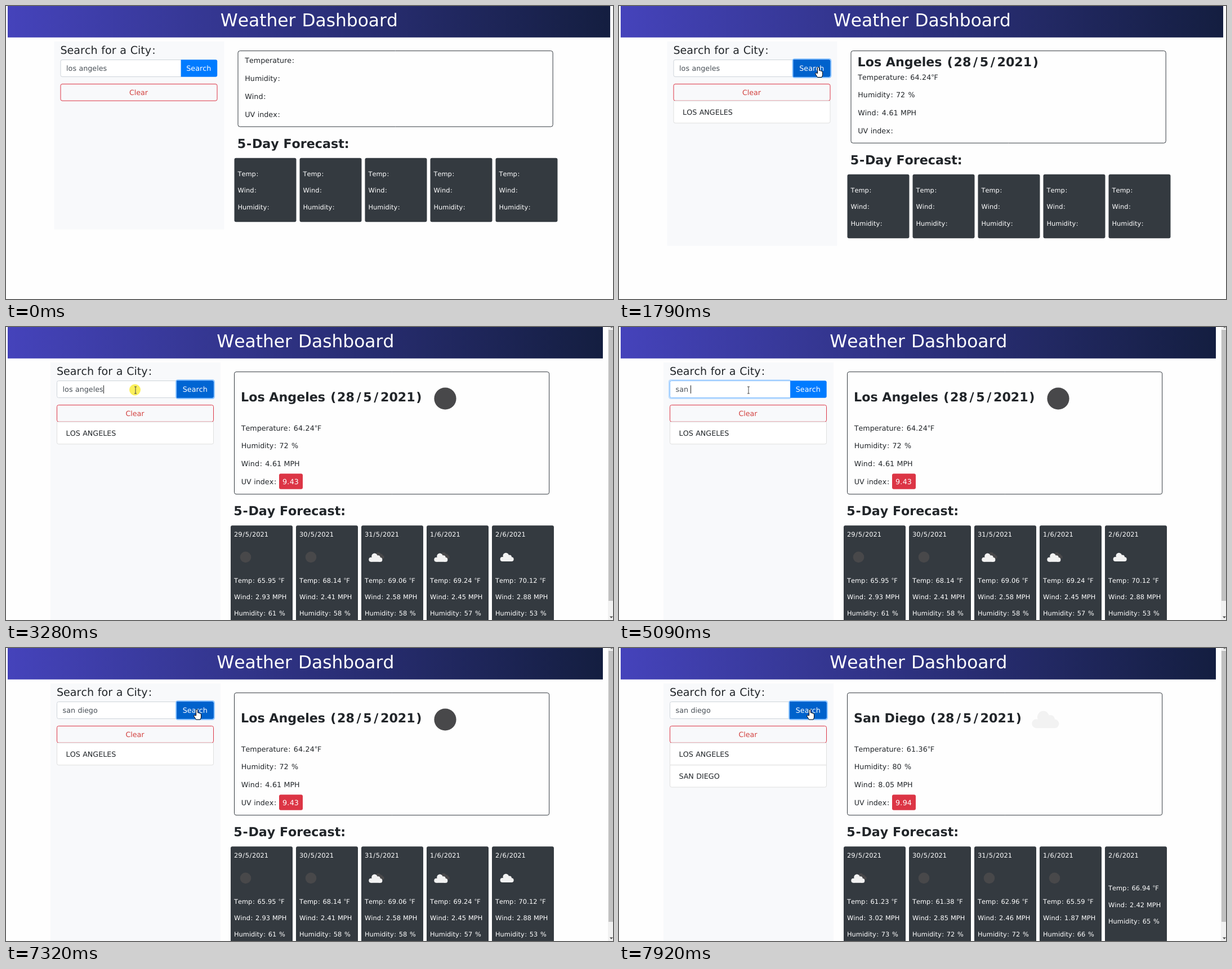
An HTML page with a canvas for the animation above (8 s loop, 1078 by 520 pixels).

```html
<!DOCTYPE html>
<html lang="en">
<head>
<meta charset="utf-8">
<title>Weather Dashboard</title>
<style>
html, body { margin: 0; width: 100%; height: 100%; overflow: hidden; background: #fefefe; }
canvas { display: block; }
</style>
</head>
<body>
<canvas id="stage" width="1078" height="520"></canvas>
<script>
const ctx = document.getElementById('stage').getContext('2d');
const LOOP = 8000, BODY = 12.69, CARD = 11.4, HEAD = 22.2;
const INK = '#212529', DARK = '#343a40', RED = '#dc3545', MOON = '#48484a', CLOUD = '#f2f2f2';

const CITIES = {
  la: { name: 'Los Angeles', temp: '64.24', hum: 72, wind: '4.61', uv: '9.43', icon: 'moon',
    days: [['65.95', '2.93', 61], ['68.14', '2.41', 58], ['69.06', '2.58', 58], ['69.24', '2.45', 57], ['70.12', '2.88', 53]],
    icons: ['moon', 'moon', 'broken', 'broken', 'cloud'] },
  sd: { name: 'San Diego', temp: '61.36', hum: 80, wind: '8.05', uv: '9.94', icon: 'cloud',
    days: [['61.23', '3.02', 73], ['61.38', '2.85', 72], ['62.96', '2.46', 72], ['65.59', '1.87', 66], ['66.94', '2.42', 65]],
    icons: ['broken', 'moon', 'moon', 'moon', null] }
};
const DATES = ['29/5/2021', '30/5/2021', '31/5/2021', '1/6/2021', '2/6/2021'];

const clamp = v => Math.max(0, Math.min(1, v));
const ramp = (t, start, length = 130) => clamp((t - start) / length);
const between = (t, a, b) => t >= a && t < b;

// Extra room around punctuation, in em
const PAD = { ' ': .034, ':': .117, '/': .117, '.': .046, '%': .126 };
const BOLD_PAD = { '/': .324, '(': .14, ')': .14, '-': .065 };

// Draws text centred on y and returns the x where it ends
function text(str, x, y, size, color = INK, bold = false) {
  ctx.font = `${bold ? 'bold ' : ''}${size}px "DejaVu Sans", sans-serif`;
  ctx.fillStyle = color;
  for (const part of str.split(/([ :\/.%()℉-])/)) {
    if (part === '℉') ctx.font = `${size}px "Noto Sans CJK JP", "DejaVu Sans", sans-serif`;
    const pad = ((bold ? BOLD_PAD : PAD)[part] || 0) * size;
    ctx.fillText(part, x + pad / 2, y + size * .36);
    x += ctx.measureText(part).width + pad;
  }
  return x;
}

function box(x, y, w, h, radius, fill, stroke) {
  ctx.beginPath();
  ctx.roundRect(x, y, w, h, radius);
  if (fill) { ctx.fillStyle = fill; ctx.fill(); }
  if (stroke) { ctx.strokeStyle = stroke; ctx.lineWidth = 1; ctx.stroke(); }
}

function disc(x, y, r, fill) {
  ctx.beginPath();
  ctx.arc(x, y, r, 0, 7);
  ctx.fillStyle = fill;
  ctx.fill();
}

function cloud(x, y, scale, fill) {
  for (const [dx, dy, r] of [[-1.7, -2.3, 5.3], [4.5, 0, 4], [-7.9, 3.6, 4], [8.3, 3.7, 3.9]])
    disc(x + dx * scale, y + dy * scale, r * scale, fill);
  ctx.fillRect(x - 7.9 * scale, y, 16.2 * scale, 7.6 * scale);
}

function weatherIcon(kind, x, y, scale) {
  if (kind === 'moon') disc(x, y, 9.8 * scale, MOON);
  if (kind === 'broken') {
    cloud(x + 5, y - 3, .75, MOON);
    cloud(x - 1.3, y + .8, 1, CLOUD);
  }
  if (kind === 'cloud') cloud(x, y, scale, CLOUD);
}

function pageState(t) {
  const { la, sd } = CITIES;
  if (t < 1790) return { list: [] };
  if (t < 1860) return { city: la, list: [la] };
  if (t < 1990) return { city: la, data: la, list: [la] };
  if (t < 7390) return { city: la, data: la, icons: la.icons, scroll: true, list: [la] };
  const data = t < 7520 ? la : sd, icons = t < 7590 ? la.icons : sd.icons;
  return { city: sd, data, icons, scroll: t >= 7920, list: [la, sd] };
}

function inputState(t) {
  const typed = [4690, 4890, 4950, 5090, 5290, 5360, 5480, 5680, 5750];
  let value = 'los angeles';
  if (t >= 4430) value = 'san diego'.slice(0, typed.filter(at => t >= at).length);
  else if (t >= 4160) value = value.slice(0, 8 - 2 * Math.floor((t - 4160) / 67));
  else if (t >= 3810) value = value.slice(0, 10);
  const caret = between(t, 3280, 3680) || between(t, 3810, 6280) || between(t, 6810, 7120);
  return { value, caret };
}

// Pointer moves: start, end, from, to
const MOVES = [
  [20, 240, 860, 450, 514, 291],
  [400, 980, 514, 291, 354, 108.5],
  [2560, 3080, 354, 108.5, 230, 112],
  [6590, 7030, 230, 112, 339, 109]
];
function pointerAt(t) {
  const [a, b, x0, y0, x1, y1] = MOVES.filter(m => t >= m[0]).pop() || MOVES[0];
  const p = clamp((t - a) / (b - a)), e = p * p * (3 - 2 * p);
  return { x: x0 + (x1 - x0) * e, y: y0 + (y1 - y0) * e };
}

const HAND = new Path2D('M-1.5 11V1.5a1.5 1.5 0 0 1 3 0V6q2-1 2.5.8q2-.8 2.4.9q1.2-.2 1.2 1.5V13q0 2-1.5 5H-1.5L-5 12.5q-1-2.3.8-2.3Z');
const ARROW = new Path2D('M0 0V12.5L3 9.8L5 14.3L7 13.4L5 9H9Z');
const BEAM = new Path2D('M-2-6H2M0-6V6M-2 6H2');

function drawPointer(t, pointer, overButton, overInput) {
  if (t < 70) return;
  const click = between(t, 1240, 1390) || between(t, 3280, 3410) || between(t, 7120, 7320);
  if (click) disc(pointer.x - 1, pointer.y - .5, 10, 'rgba(250,236,50,.8)');
  ctx.save();
  ctx.translate(pointer.x, pointer.y);
  ctx.lineWidth = 1;
  ctx.strokeStyle = overInput ? '#444' : '#000';
  ctx.fillStyle = '#fff';
  const shape = overButton ? HAND : overInput ? BEAM : ARROW;
  if (!overInput) ctx.fill(shape);
  ctx.stroke(shape);
  ctx.restore();
}

function drawHeader(scroll, dx) {
  const right = scroll ? 1060 : 1073;
  const shade = ctx.createLinearGradient(3, 0, right, 0);
  shade.addColorStop(0, '#4543bb');
  shade.addColorStop(1, '#141e40');
  ctx.fillStyle = shade;
  ctx.fillRect(3, 0, right - 3, 55.8);
  text('Weather Dashboard', 374.3 + dx, 25, 31.3, '#fff');
}

function drawScrollbar() {
  ctx.fillStyle = '#f1f1f1';
  ctx.fillRect(1069, 0, 9, 520);
  ctx.fillStyle = '#c1c1c1';
  ctx.fillRect(1070, 5, 8, 481);
  ctx.fillStyle = '#505050';
  ctx.fill(new Path2D('M1072 513.5h6l-3 3.5zM1073 1.5h5L1075.5 0z'));
}

function drawSidebar(t, dx, list, bottom, overButton) {
  box(79 + dx, 63, 302, bottom - 63, 0, '#f8f9fb');
  text('Search for a City:', 90 + dx, 78, 19.1);

  const inputFocus = ramp(t, 3280) - ramp(t, 7120);
  const buttonFocus = ramp(t, 1240) - ramp(t, 3290) + ramp(t, 7120);
  const ring = (x, w, color, amount) => {
    ctx.globalAlpha = amount;
    box(x - 2.2, 93, w + 4.4, 35, 4.5, color);
    ctx.globalAlpha = 1;
  };
  const field = 90 + dx, grow = buttonFocus > .5 ? 1 : 0, button = 304.2 + dx - grow;
  const corners = [3, 0, 0, 3];
  ring(field, 214, '#bfdeff', inputFocus);
  box(field + .5, 95.5, 214, 30, corners, '#fff', inputFocus > .5 ? '#80bdff' : '#ced4da');
  ring(button, 64.5 + grow, '#93c7ff', buttonFocus);
  box(button, 95.2, 64.5 + grow, 30.5, [0, 3, 3, 0], '#007bff');
  ctx.globalAlpha = Math.max(buttonFocus * (overButton ? 1 : .85), overButton ? .75 : 0);
  box(button, 95.2, 64.5 + grow, 30.5, [0, 3, 3, 0], '#0062cc');
  ctx.globalAlpha = 1;
  text('Search', 313.8 + dx, 110.7, BODY, '#fff');

  const { value, caret } = inputState(t);
  const end = text(value, 100.6 + dx, 110.7, BODY, '#495057');
  if (caret) {
    ctx.fillStyle = '#222';
    ctx.fillRect(Math.round(end), 103.5, 1, 14.5);
  }

  box(90.5 + dx, 138.5, 278, 29.7, 3, null, RED);
  text('Clear', 212.4 + dx, 153.6, BODY, '#d2413f');
  list.forEach((city, i) => {
    box(90.5 + dx, 168.6 + 39.2 * i, 278, 39.2, i === list.length - 1 ? [0, 0, 3, 3] : 0, '#fff', '#dfdfdf');
    text(city.name.toUpperCase(), 106.6 + dx, 188.4 + 39 * i, BODY);
  });
}

function drawCurrent(dx, { city, data, scroll }, bottom) {
  box(405.5 + dx, 79.6, 559.2, bottom - 79.9, 3.5, '#fefefe', DARK);
  const x = 417.8 + dx, first = scroll ? 179 : city ? 126 : 96.7;
  if (city) {
    const y = scroll ? 124.5 : 99.5, end = text(`${city.name} (28/5/2021)`, x - .8, y, HEAD, INK, true);
    if (scroll) weatherIcon(city.icon, Math.round(end) + 40, 127, 2);
  }
  const row = (i, label, value) => text(label + (value ? ' ' + value : ''), x, first + 31.8 * i, BODY);
  row(0, 'Temperature:', city && city.temp + '℉');
  row(1, 'Humidity:', city && city.hum + ' %');
  row(2, 'Wind:', city && city.wind + ' MPH');
  row(3, 'UV index:');
  if (data) {
    const y = first + 95.4;
    box(485 + dx, y - 14.2, 42, 27.6, 3, RED);
    text(data.uv, 491 + dx, y, BODY, '#fff');
  }
}

function drawForecast(dx, { data, icons }, top, height) {
  text('5-Day Forecast:', 404.3 + dx, top - 25.8, HEAD, INK, true);
  DATES.forEach((date, i) => {
    const left = 399 + dx + 116 * i, x = left + 6, icon = icons && icons[i];
    box(left, top, 110, height, 3, DARK);
    const first = top + (icon ? 97.3 : data ? 74 : 28);
    const [temp, wind, hum] = data ? data.days[i] : [];
    const row = (n, label, value) => text(label + (data ? ' ' + value : ''), x, first + 29.4 * n, CARD, '#fff');
    if (data) text(date, x, top + 15.4, CARD, '#fff');
    if (icon) weatherIcon(icon, left + 26.5, top + 56.2, 1);
    row(0, 'Temp:', temp + ' ℉');
    row(1, 'Wind:', wind + ' MPH');
    row(2, 'Humidity:', hum + ' %');
  });
}

function draw(t) {
  const state = pageState(t), dx = state.scroll ? 0 : 6.5;
  const cardBottom = state.scroll ? 297 : state.city ? 243.5 : 214.5;
  const top = cardBottom + 55.2, height = state.icons ? 183 : state.data ? 160 : 113.5;
  const pointer = pointerAt(t);
  const inRow = between(pointer.y, 96, 126);
  const overButton = inRow && between(pointer.x, 304 + dx, 369 + dx);
  const overInput = inRow && between(pointer.x, 90 + dx, 304 + dx);

  ctx.fillStyle = '#fefefe';
  ctx.fillRect(0, 0, 1078, 520);
  drawHeader(state.scroll, dx);
  drawSidebar(t, dx, state.list, top + height + 13.3, overButton);
  drawCurrent(dx, state, cardBottom);
  drawForecast(dx, state, top, height);
  if (state.scroll) drawScrollbar();
  drawPointer(t, pointer, overButton, overInput);
}

ctx.fontKerning = 'none';
ctx.textRendering = 'geometricPrecision';
const start = performance.now();
function tick() {
  draw((performance.now() - start) % LOOP);
  requestAnimationFrame(tick);
}
tick();
</script>
</body>
</html>
```
